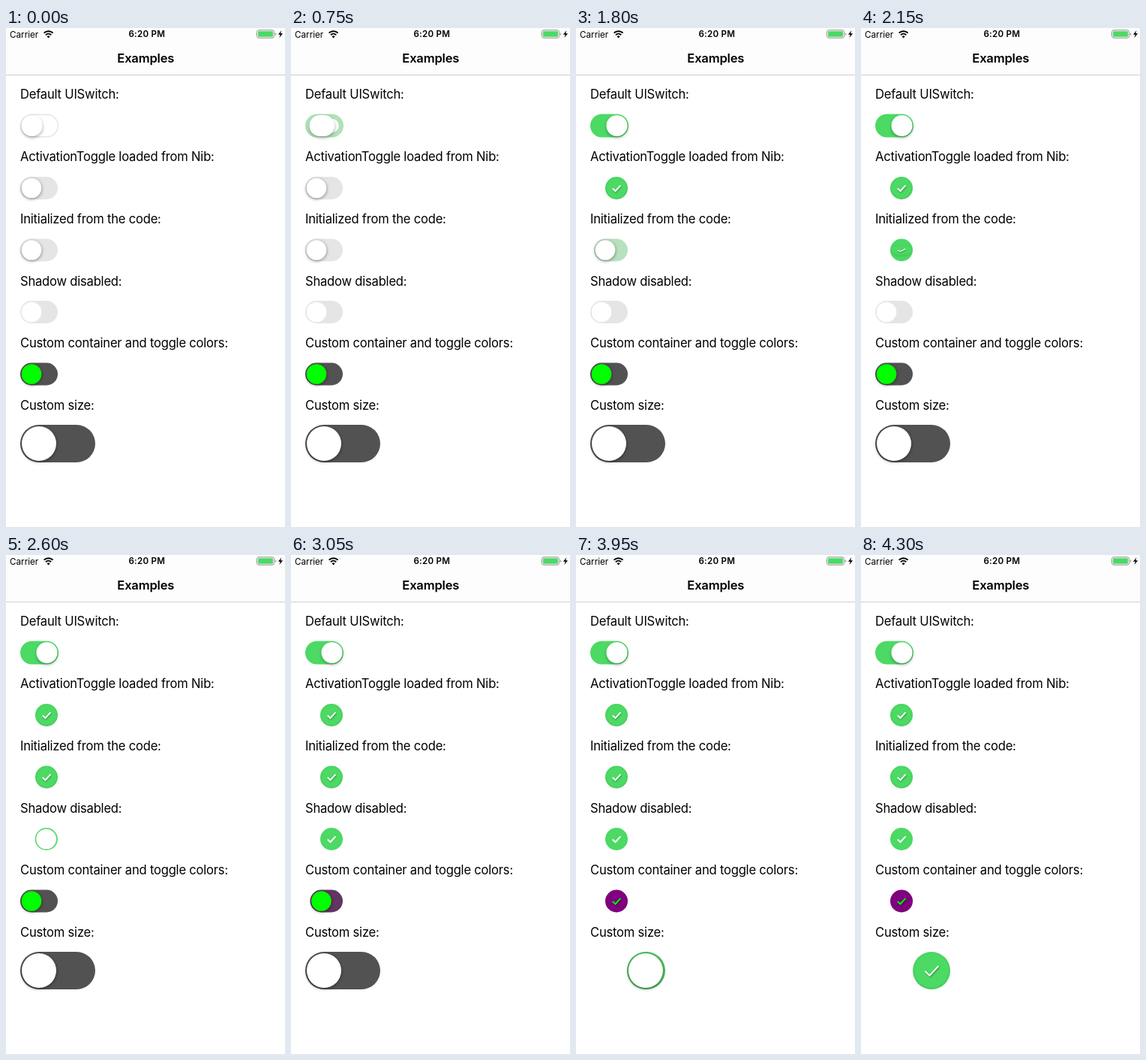
Animation, 372 px wide and 664 px high, one loop 4400 ms. Source, as an HTML page with a canvas:

```html
<!DOCTYPE html>
<html lang="en">
<head>
<meta charset="utf-8">
<title>Examples</title>
<style>
html, body { margin: 0; width: 100%; height: 100%; overflow: hidden; background: #fff; }
svg, canvas { position: absolute; left: 0; top: 0; width: 372px; height: 664px; }
text { font-family: Inter, "Liberation Sans", sans-serif; fill: #000; }
.label { font-size: 16.6px; letter-spacing: -0.22px; }
.title { font-size: 16.6px; font-weight: 600; letter-spacing: -0.2px; text-anchor: middle; }
.status { font-size: 11.7px; }
.time { font-size: 11.6px; font-weight: 600; letter-spacing: 0.25px; text-anchor: middle; }
</style>
</head>
<body>
<svg viewBox="0 0 372 664">
  <rect width="372" height="62" fill="#fdfdfd"/>
  <rect y="62" width="372" height="1" fill="#cfcfcf"/>
  <text class="status" x="5" y="12.6">Carrier</text>
  <g fill="none" stroke="#000" stroke-width="2">
    <path d="M50.6 6.6a8.6 8.6 0 0 1 12 0"/>
    <path d="M53 9.2a5.2 5.2 0 0 1 7.2 0"/>
  </g>
  <path d="M56.6 13.4l-2-2.1a2.9 2.9 0 0 1 4 0z"/>
  <text class="time" x="187.8" y="12.4">6:20 PM</text>
  <rect x="334.5" y="2.8" width="23" height="10.4" rx="2.6" fill="none" stroke="#8d8d8d"/>
  <rect x="336" y="4.3" width="20" height="7.4" rx="1.3" fill="#4cd964"/>
  <path d="M359 6.2a2 2 0 0 1 0 3.7z" fill="#8d8d8d"/>
  <path d="M367.3 3.2l-4.4 5.5h2.8l-1.3 4.3 4.7-5.8h-2.9z"/>
  <text class="title" x="186.3" y="46">Examples</text>
  <text class="label" x="19" y="94">Default UISwitch:</text>
  <text class="label" x="19" y="177">ActivationToggle loaded from Nib:</text>
  <text class="label" x="19" y="260">Initialized from the code:</text>
  <text class="label" x="19" y="342.5">Shadow disabled:</text>
  <text class="label" x="19" y="425">Custom container and toggle colors:</text>
  <text class="label" x="19" y="507.5">Custom size:</text>
</svg>
<canvas></canvas>
<script>
const LOOP = 4400, STEP = 50, SLIDE = 250, TINT = 270, FLIP = 300;
const LEFT = 19;
const WHITE = [255, 255, 255], GREEN = [76, 217, 100], GRAY = [229, 229, 229];
const DARK = [82, 82, 82], LIME = [0, 255, 0], PURPLE = [128, 0, 128];

const toggles = [
  { start: 1150, y: 213 },
  { start: 1718, y: 295.5 },
  { start: 2370, y: 378, flat: true },
  { start: 2955, y: 460.5, off: DARK, on: PURPLE, knob: LIME },
  { start: 3722, y: 553, off: DARK, w: 100, h: 50 }
];

const canvas = document.querySelector('canvas');
const ctx = canvas.getContext('2d');
const dpr = window.devicePixelRatio || 1;
canvas.width = 372 * dpr;
canvas.height = 664 * dpr;

const clamp = v => Math.max(0, Math.min(1, v));
const lerp = (a, b, p) => a + (b - a) * p;
const rgb = c => `rgb(${c.map(Math.round).join()})`;
const mix = (a, b, p) => rgb(a.map((v, i) => lerp(v, b[i], p)));
const ease = p => (p = clamp(p)) * p * (3 - 2 * p);
const phase = (t, from, length) => ease((t - from) / length);

function pill(x, y, w, h, fill) {
  ctx.beginPath();
  ctx.roundRect(x, y, w, h, Math.min(w, h) / 2);
  ctx.fillStyle = fill;
  ctx.fill();
}

function shadow(alpha, dx, dy, blur) {
  ctx.shadowColor = `rgba(0,0,0,${alpha})`;
  ctx.shadowOffsetX = dx * dpr;
  ctx.shadowOffsetY = dy * dpr;
  ctx.shadowBlur = blur * dpr;
}

function drawCheck(r, color, flat) {
  const k = r / 15;
  if (!flat) shadow(color === LIME ? 0.6 : 0.35, 0.5 * k, 1.2, 2);
  ctx.beginPath();
  ctx.moveTo(-5.2 * k, 0.5 * k);
  ctx.lineTo(-1.5 * k, 4 * k);
  ctx.lineTo(5.5 * k, -3.6 * k);
  ctx.lineWidth = 2;
  ctx.strokeStyle = rgb(color);
  ctx.stroke();
}

function drawToggle(t, o) {
  const { w = 50, h = 30, y, off = GRAY, on = GREEN, knob = WHITE, flat } = o;
  const p = phase(t, o.start, SLIDE);
  const tint = clamp((t - o.start) / TINT);
  const angle = Math.PI * phase(t, o.start + SLIDE, FLIP);
  const front = Math.cos(angle) > 0;
  const x = LEFT + (w - h) * p;
  const r = h / 2;
  pill(x, y - r, LEFT + w - x, h, mix(off, on, tint));

  ctx.save();
  ctx.translate(x + r, y);
  ctx.scale(1, Math.max(0.01, Math.abs(Math.cos(angle))));
  ctx.save();
  if (!flat) shadow(front ? 0.46 : 0.12, 0, 1.2, 4);
  const inner = r - (h > 40 ? 2 : 1.7);
  pill(-inner, -inner, inner * 2, inner * 2, rgb(front ? knob : on));
  ctx.restore();
  if (!front) drawCheck(r, knob, flat);
  ctx.restore();
}

function drawSwitch(t) {
  const w = 51, h = 31, y = 130, r = h / 2;
  const fill = phase(t, 620, 330);
  const move = phase(t, 660, 260);
  const stretch = 5.5 * phase(t, 600, 120) * (1 - phase(t, 820, 200));
  pill(LEFT, y - r, w, h, mix(GRAY, GREEN, fill));
  const gap = lerp(1.4, r, fill);
  if (fill < 1) pill(LEFT + gap, y - r + gap, w - 2 * gap, h - 2 * gap, '#fff');
  const size = 28, width = size + stretch;
  const x = lerp(LEFT + 1.5, LEFT + w - 1.5 - width, move);
  ctx.save();
  shadow(0.3, 0.3, 2.2, 4);
  pill(x, y - size / 2, width, size, '#fff');
  ctx.restore();
}

function frame(now) {
  const t = Math.floor((now % LOOP) / STEP) * STEP;
  ctx.setTransform(dpr, 0, 0, dpr, 0, 0);
  ctx.clearRect(0, 0, 372, 664);
  drawSwitch(t);
  toggles.forEach(o => drawToggle(t, o));
  requestAnimationFrame(frame);
}

frame(0);
</script>
</body>
</html>
```
